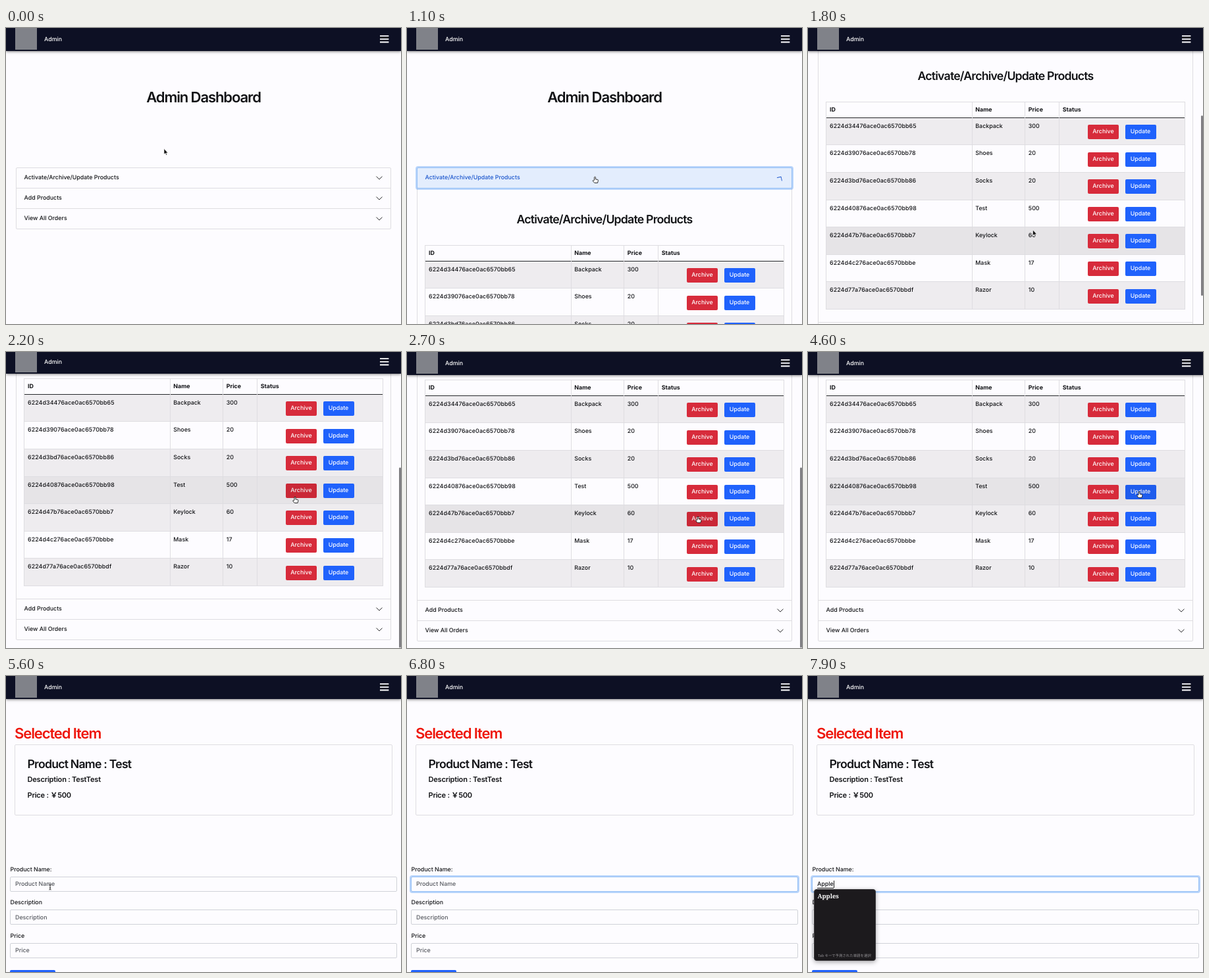
An HTML page that plays this animation: 600 px wide and 450 px high, repeating every 8 s.

```html
<!DOCTYPE html>
<html lang="en">
<head>
<meta charset="utf-8">
<title>Admin Dashboard</title>
<style>
html, body { margin: 0; width: 100%; height: 100%; overflow: hidden; background: #fdfcff; }
#stage {
  position: absolute; left: 0; top: 0; width: 600px; height: 450px; overflow: hidden;
  background: #fdfcff; color: #121316;
  font: 450 8.86px/20px Inter, "Open Sans", sans-serif;
  font-optical-sizing: none; text-rendering: geometricPrecision;
}
#stage div, #stage svg { position: absolute; box-sizing: border-box; }
#stage svg { overflow: visible; }
.text { white-space: pre; height: 20px; }
.layer { left: 0; top: 0; width: 600px; height: 800px; }
.mid { width: 600px; text-align: center; }
.h1 { font-size: 22.1px; font-weight: 600; letter-spacing: -.052em; }
.h2 { font-size: 17.7px; font-weight: 600; letter-spacing: -.045em; }
.h5 { font-size: 11.07px; font-weight: 600; letter-spacing: -.02em;
  font-family: Inter, "Noto Sans CJK JP", "Noto Sans CJK", sans-serif; }
.red { color: #ee1509; }
.bold { font-weight: 700; }
.id { letter-spacing: .08px; }
.nav { background: #0d1024; box-shadow: 0 1px 4px rgba(0, 0, 0, .5); }
.nav .text { color: #fff; }
.logo { background: #808289; }
.frame { border: 1px solid #dedde1; border-radius: 2px; }
.line { background: #dedde1; }
.dark { background: #26282b; }
.odd { background: #eeecef; }
.hover { background: #e6e4e7; }
.btn { height: 22px; border-radius: 2px; color: #fff; text-align: center; line-height: 22.6px; white-space: pre; }
.blue { background: #2062fc; }
.danger { background: #d72b3b; }
.green { background: #19693f; box-shadow: 0 0 0 2px rgba(25, 135, 84, .45); }
.over { filter: brightness(.94); }
.open { background: #e3edfd; }
.ring { border: 1px solid #98c1f5; border-radius: 2px; box-shadow: 0 0 0 2px rgba(70, 145, 245, .38); }
.input { border: 1px solid #d0d2d8; border-radius: 2px; background: #fdfcff; }
.hint { color: #56595f; }
.typed { border-bottom: 1px solid #222; height: 16px; }
.caret { background: #222; }
.pop { background: #1c1a1d; border: 1px solid #39373a; border-radius: 4px; box-shadow: 0 2px 7px rgba(0, 0, 0, .35); }
.word { color: #fff; font: 600 9.4px/20px "Noto Serif", serif; }
.tip { color: #98969a; font: 5.45px/20px "Noto Sans CJK JP", "Noto Sans CJK", sans-serif; }
.thumb { background: #7f7e82; border-radius: 2px; }
</style>
</head>
<body>
<div id="stage"></div>
<script>
const LOOP = 8000, STEP = 100;
const MAX_SCROLL = 288, BODY_H = 422, ROW_TOP = 354.8, ROW_H = 41.6, BTN_TOP = 365;
const OPEN_AT = 985, ACTIVATE = [2800, 4000], PAGE_AT = 4800, FOCUS_AT = 5900;
const stage = document.getElementById('stage');

function box(parent, x, y, w, h, cls = '') {
  const el = document.createElement('div');
  el.className = cls;
  Object.assign(el.style, { left: x + 'px', top: y + 'px', width: w + 'px', height: h + 'px' });
  parent.append(el);
  return el;
}

// y is the middle of the capitals
function text(parent, x, y, str, cls = '') {
  const el = document.createElement('div');
  el.className = 'text ' + cls;
  el.style.left = x + 'px';
  el.style.top = y - 9.3 + 'px';
  el.textContent = str;
  parent.append(el);
  return el;
}

function button(parent, x, y, w, label, cls) {
  const el = box(parent, x, y, w, 22, 'btn ' + cls);
  el.textContent = label;
  return el;
}

function icon(parent, x, y, d, attrs) {
  const ns = 'http://www.w3.org/2000/svg';
  const svg = document.createElementNS(ns, 'svg');
  const path = document.createElementNS(ns, 'path');
  svg.setAttribute('width', 1);
  svg.setAttribute('height', 1);
  svg.style.left = x + 'px';
  svg.style.top = y + 'px';
  path.setAttribute('d', d);
  for (const k in attrs) path.setAttribute(k, attrs[k]);
  svg.append(path);
  parent.append(svg);
  return svg;
}

const show = (el, on) => { el.style.display = on ? '' : 'none'; };
const shift = (el, x, y) => { el.style.transform = `translate(${x}px, ${y}px)`; };
const clamp = v => Math.max(0, Math.min(1, v));
const ease = p => 1 - (1 - clamp(p)) ** 2;

// Linear track through rows of [time, ...values]
function track(rows, t, col) {
  let i = rows.length - 1;
  while (i > 0 && rows[i][0] > t) i--;
  const a = rows[i], b = rows[i + 1] || a;
  const p = b === a ? 0 : (t - a[0]) / (b[0] - a[0]);
  return a[col] + (b[col] - a[col]) * p;
}

function stepValue(rows, t, col) {
  return rows.filter(r => r[0] <= t).pop()[col];
}

// Dashboard page
const dash = box(stage, 0, 0, 600, 738);
text(dash, 0, 105, 'Admin Dashboard', 'mid h1');
const frame = box(dash, 15, 212, 570, 94, 'frame');

function chevron(parent, y) {
  return icon(parent, 566.5, y, 'M-4.2-2.1L0 2.1L4.2-2.1', {
    fill: 'none', stroke: 'currentColor', 'stroke-width': .9,
    'stroke-linecap': 'round', 'stroke-linejoin': 'round'
  });
}

const head = box(dash, 15, 212, 570, 32);
const headText = box(dash, 0, 0, 600, 0);
text(headText, 27.5, 227.5, 'Activate/Archive/Update Products');
const headArrow = chevron(headText, 228);
headArrow.style.transformOrigin = '0 0';

const body = box(dash, 0, 244, 600, 0);
body.style.overflow = 'hidden';
const inner = box(body, 0, -244, 600, 738);
text(inner, 0, 291.6, 'Activate/Archive/Update Products', 'mid h2');

const names = ['Backpack', 'Shoes', 'Socks', 'Test', 'Keylock', 'Mask', 'Razor'];
const prices = [300, 20, 20, 500, 60, 17, 10];
const codes = ['34476ace0ac6570bb65', '39076ace0ac6570bb78', '3bd76ace0ac6570bb86',
  '40876ace0ac6570bb98', '47b76ace0ac6570bbb7', '4c276ace0ac6570bbbe', '77a76ace0ac6570bbdf'];
const rowTop = i => ROW_TOP + ROW_H * i;

const rows = names.map((_, i) => box(inner, 28, rowTop(i), 544, ROW_H));
names.forEach((_, i) => box(inner, 28, Math.round(rowTop(i + 1)) - 1, 544, 1, 'line'));
box(inner, 27, 330, 546, 1, 'line');
box(inner, 27, 330, 1, 316, 'line');
box(inner, 572, 330, 1, 316, 'line');
box(inner, 28, 354, 544, 1, 'dark');
text(inner, 33, 342.5, 'ID', 'bold');

const cols = box(inner, 0, 0, 600, 0);
const buttons = box(inner, 0, 0, 600, 0);
[249, 329, 381].forEach(x => box(cols, x, 330, 1, 316, 'line'));
[[254.3, 'Name'], [334.8, 'Price'], [386.8, 'Status']].forEach(([x, s]) => text(cols, x, 342.5, s, 'bold'));

const archives = [], updates = [];
names.forEach((name, i) => {
  const y = 367 + ROW_H * i, by = BTN_TOP + ROW_H * i;
  text(inner, 33, y, '6224d' + codes[i], 'id');
  text(cols, 254.3, y, name);
  text(cols, 334.8, y, String(prices[i]));
  archives.push(button(buttons, 425, by, 47, 'Archive', 'danger'));
  updates.push(button(buttons, 481.5, by, 47, 'Update', 'blue'));
});
const activate = button(inner, 423, BTN_TOP + ROW_H * 4, 49, 'Activate', 'green');

const rest = box(dash, 0, 0, 600, 0);
box(rest, 16, 243, 568, 1, 'line');
box(rest, 16, 274, 568, 1, 'line');
text(rest, 27.5, 258.7, 'Add Products');
text(rest, 27.5, 289.7, 'View All Orders');
chevron(rest, 259);
chevron(rest, 290);

// Update page
const form = box(stage, 0, 0, 600, 450);
text(form, 13, 87, 'Selected Item', 'h1 red');
box(form, 13, 104, 574, 108, 'frame');
text(form, 32.5, 134, 'Product Name : Test', 'h2');
text(form, 32.5, 156.3, 'Description : TestTest', 'h5');
text(form, 32.5, 180, 'Price : ￥500', 'h5');
const hints = ['Product Name', 'Description', 'Price'].map((label, i) => {
  const y = 294 + 50.4 * i;
  text(form, 6.5, y, i ? label : label + ':');
  box(form, 6, Math.round(y + 11), 588, 23, 'input');
  return text(form, 14, y + 22.7, label, 'hint');
});
const ring = box(form, 6, 305, 588, 23, 'ring');
box(form, 6, 447, 69, 22, 'btn blue');
const typed = text(form, 14, 315.8, '', 'typed');
const caret = box(form, 14, 311, 1, 11, 'caret');
const pop = box(form, 9, 324, 94, 109, 'pop');
text(pop, 4.5, 9.3, 'Apples', 'word');
text(pop, 5, 99.3, 'Tab キーで予測された単語を選択', 'tip');

// Top bar, scrollbar, pointer
const nav = box(stage, 0, -10, 600, 45, 'nav');
box(nav, 14, 10, 33, 33, 'logo');
text(nav, 58, 27, 'Admin');
icon(nav, 568, 10, 'M0 12.1H13.4M0 16.8H13.4M0 21.5H13.4', { stroke: '#fff', 'stroke-width': 1.8 });
const thumb = box(stage, 597, 0, 3, 274, 'thumb');

const pointers = {
  arrow: icon(stage, 0, 0, 'M0 0V8.6L2 6.8L3.3 9.8L4.6 9.2L3.4 6.4H6Z',
    { fill: '#111', stroke: '#fff', 'stroke-width': .6 }),
  hand: icon(stage, 0, 0, 'M-1 5V.8Q0-.4 1 .8V4L4.2 4.4Q5 4.8 4.8 6.3L4 9.5H-.6L-3.4 6.4Q-3.2 5-1.8 6Z',
    { fill: '#fff', stroke: '#1a1a1a', 'stroke-width': .9 }),
  beam: icon(stage, 0, 0, 'M-1.6-4Q0-4 0-3V3Q0 4-1.6 4M1.6-4Q0-4 0-3M0 3Q0 4 1.6 4M-1 1H1',
    { fill: 'none', stroke: '#222', 'stroke-width': .9 })
};

const path = [
  [0, 240, 183.5, 'arrow'], [200, 240, 183.5, 'arrow'], [500, 265, 251, 'hand'],
  [600, 265, 251, 'hand'], [900, 285.5, 226, 'hand'], [1200, 285.5, 226, 'hand'],
  [1500, 341.5, 307, 'arrow'], [2000, 341.5, 307, 'arrow'], [2200, 439, 220, 'hand'],
  [2500, 442, 250, 'hand'], [3200, 442, 250, 'arrow'], [3500, 449.5, 195, 'arrow'],
  [3800, 446, 250, 'hand'], [4200, 446, 250, 'hand'], [4600, 503, 212, 'hand'],
  [4800, 503, 212, 'arrow'], [5000, 503, 212, 'arrow'], [5300, 60, 420, 'beam'],
  [5600, 67, 321, 'beam'], [6500, 67, 321, 'none']
];
const scrolls = [[0, 0], [1500, 0], [1600, 40], [1700, 140], [1800, 218], [1900, 262],
  [2000, 283], [2100, 290.5], [2200, 290], [2400, 288]];

function draw(t) {
  const onForm = t >= PAGE_AT;
  const x = track(path, t, 1), y = track(path, t, 2), kind = stepValue(path, t, 3);
  for (const k in pointers) {
    show(pointers[k], k === kind);
    shift(pointers[k], x, y);
  }
  show(dash, !onForm);
  show(form, onForm);

  const scroll = track(scrolls, t, 1);
  shift(nav, 0, onForm ? 0 : -Math.max(0, scroll - MAX_SCROLL));
  shift(dash, 0, -scroll);
  shift(thumb, 0, Math.min(scroll, MAX_SCROLL) * 450 / 738);
  thumb.style.opacity = t < 1600 ? 0 : clamp((3100 - t) / 300);

  const since = t - OPEN_AT, opened = since > 0;
  const h = BODY_H * ease(since / 350);
  body.style.height = h + 'px';
  frame.style.height = 94 + h + 'px';
  shift(rest, 0, h);
  head.className = opened ? 'open ring' : '';
  headText.style.color = opened ? '#1a55cc' : '';
  headArrow.style.transform = `rotate(${-180 * ease(since / 200)}deg)`;

  const py = y + scroll;
  const hover = opened ? Math.floor((py - ROW_TOP) / ROW_H) : -1;
  rows.forEach((row, i) => { row.className = i === hover ? 'hover' : i % 2 ? '' : 'odd'; });
  const over = (i, left) => i === hover && kind === 'hand' && x > left && x < left + 47
    && Math.abs(py - BTN_TOP - 11 - ROW_H * i) < 11;
  archives.forEach((b, i) => b.classList.toggle('over', over(i, 425)));
  updates.forEach((b, i) => b.classList.toggle('over', over(i, 481)));

  const active = t >= ACTIVATE[0] && t < ACTIVATE[1];
  shift(cols, active ? -2 : 0, 0);
  shift(buttons, active ? -1 : 0, 0);
  shift(updates[4], active ? 1 : 0, 0);
  show(archives[4], !active);
  show(activate, active);

  const focused = t >= FOCUS_AT;
  const word = 'Apple'.slice(0, Math.max(0, Math.floor((t - 6700) / 200)));
  ring.style.opacity = focused ? ease((t - FOCUS_AT + 60) / 150) : 0;
  typed.textContent = word;
  show(typed, word);
  show(hints[0], !word);
  show(caret, focused && (word || t < 6500));
  caret.style.left = 14 + (word ? typed.offsetWidth : 0) + 'px';
  show(pop, t >= 7200);
}

const start = performance.now();
function tick() {
  const t = (performance.now() - start) % LOOP;
  draw(Math.floor(t / STEP) * STEP);
  requestAnimationFrame(tick);
}
tick();
</script>
</body>
</html>
```
